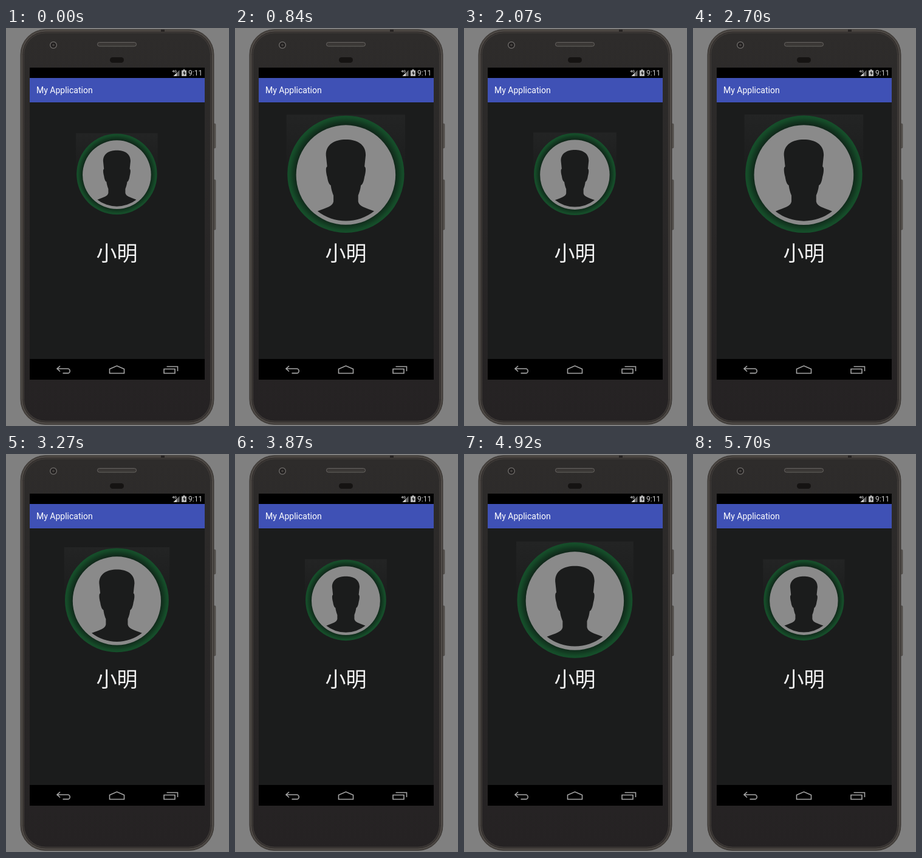
An HTML page that plays this animation: 367x653 px, repeating every 5.73 s.

```html
<!DOCTYPE html>
<html lang="zh">
<head>
<meta charset="utf-8">
<title>Pulsing avatar</title>
<style>
  html, body { margin: 0; width: 100%; height: 100%; overflow: hidden; background: #808080; }
  svg { display: block; }
  text { font-family: Roboto, sans-serif; }
  .name { font: 500 34px "Noto Sans CJK SC", "Noto Sans CJK", sans-serif; }
</style>
</head>
<body>
<svg width="367" height="653" viewBox="0 0 367 653">
  <defs>
    <linearGradient id="body" x2="0" y2="1">
      <stop offset="0" stop-color="#2e2c2b"/>
      <stop offset=".5" stop-color="#292727"/>
      <stop offset="1" stop-color="#252223"/>
    </linearGradient>
    <linearGradient id="sheen" x2="0" y2="1">
      <stop offset="0" stop-color="#232424"/>
      <stop offset=".5" stop-color="#1b1c1c"/>
    </linearGradient>
    <radialGradient id="ring" gradientUnits="userSpaceOnUse" cx="0" cy="0" r="97">
      <stop offset=".85" stop-color="#10281a"/>
      <stop offset=".91" stop-color="#123a21"/>
      <stop offset=".96" stop-color="#154a28"/>
      <stop offset="1" stop-color="#15502b"/>
    </radialGradient>
  </defs>

  <!-- phone -->
  <g fill="#57534f" stroke="#403d3a" stroke-width=".6">
    <rect x="341" y="157" width="4" height="40" rx="1.500"/>
    <rect x="341" y="249" width="4" height="82" rx="1.500"/>
  </g>
  <rect x="24" y="2.500" width="318" height="648" rx="41" fill="#47433f" stroke="#3b3734"/>
  <rect x="26.500" y="5" width="313" height="643" rx="38.500" fill="#35312f" stroke="#5a5551"/>
  <rect x="29.500" y="8" width="307" height="637" rx="35.500" fill="url(#body)" stroke="#413d3a"/>
  <rect x="255" y="2" width="6" height="4" fill="#292625"/>
  <rect x="150.500" y="23.500" width="64" height="6.500" rx="3.200" fill="#3a3735" stroke="#676461"/>
  <rect x="171" y="48" width="23" height="9" rx="4.500" fill="#151312"/>
  <circle cx="78" cy="28" r="5.300" fill="#201e1e" stroke="#696664" stroke-width="1.500"/>
  <circle cx="78" cy="28" r="2" fill="#45423f"/>

  <!-- screen -->
  <path d="M39 65h288v512H39z"/>
  <path d="M39 121h288v422H39z" fill="#1b1c1c"/>
  <path d="M39 82h288v40H39z" fill="#3f51b5"/>
  <text x="50" y="107" font-size="14" fill="#fff">My Application</text>

  <!-- status icons -->
  <g fill="#cfcfcf">
    <text x="300" y="77.700" font-size="12">9:11</text>
    <text x="273.500" y="73" font-size="6" font-weight="700">4G</text>
    <path d="M285.500 69v10h-10z" fill="#666"/>
    <path d="M281 73.500v5.500h-5.500z"/>
    <path d="M291.500 68h3v1.500h2.500v9.500h-8v-9.500h2.500z" fill="#bbb"/>
    <path d="M294 70.500l-3 4h2v3l3-4h-2z" fill="#222"/>
  </g>

  <!-- navigation icons -->
  <g fill="none" stroke="#a6a6a6" stroke-width="1.600">
    <path d="M89 554.500l-5 4.500 5 4.500M84.500 559h17a3.700 3.700 0 0 1 0 7.400h-8"/>
    <path d="M170.500 566.500v-7l12-5.200 12 5.200v7z"/>
    <path d="M260 559.500h18v7h-18zM264.500 555.500h18v7.500"/>
  </g>

  <g id="avatar">
    <path d="M-98.500-98.500h197v197h-197z" fill="url(#sheen)"/>
    <circle r="97" fill="url(#ring)"/>
    <g transform="translate(0 1.300)">
      <circle r="82.500" fill="#8a8a8a"/>
      <path fill="#1b1c1c" d="M-33-33C-33-51-18-58.500 0-58.500S33-51 33-33L31-14C34-13 33-4 31 3C30 10 28 16 25 17C24 25 22 30 20.500 34V44C22 52 32 54 47 60A76.500 76.500 0 0 1-47 60C-32 54-22 52-20.500 44V34C-22 30-24 25-25 17C-28 16-30 10-31 3C-33-4-34-13-31-14Z"/>
    </g>
  </g>

  <text class="name" x="148.500" y="382.300" fill="#f2f2f2">小明</text>
</svg>
<script>
  const LOOP = 5730, STEP = 30;
  const PULSE = 1855, START = 103, RAMP = 850, HOLD = 100;
  const SMALL = 134, LARGE = 198, ART = 197;
  const avatar = document.getElementById('avatar');

  const ease = p => (1 - Math.cos(Math.PI * Math.min(Math.max(p, 0), 1))) / 2;

  // Grow, pause at full size, shrink, pause briefly.
  function sizeAt(t) {
    const u = (t - START + PULSE) % PULSE;
    const grown = ease(u / RAMP) - ease((u - RAMP - HOLD) / RAMP);
    return SMALL + (LARGE - SMALL) * grown;
  }

  function draw(now) {
    const t = now % LOOP;
    const scale = sizeAt(t - t % STEP) / ART;
    avatar.setAttribute('transform', `translate(182.400 239.800) scale(${scale})`);
    requestAnimationFrame(draw);
  }
  draw(performance.now());
</script>
</body>
</html>
```
